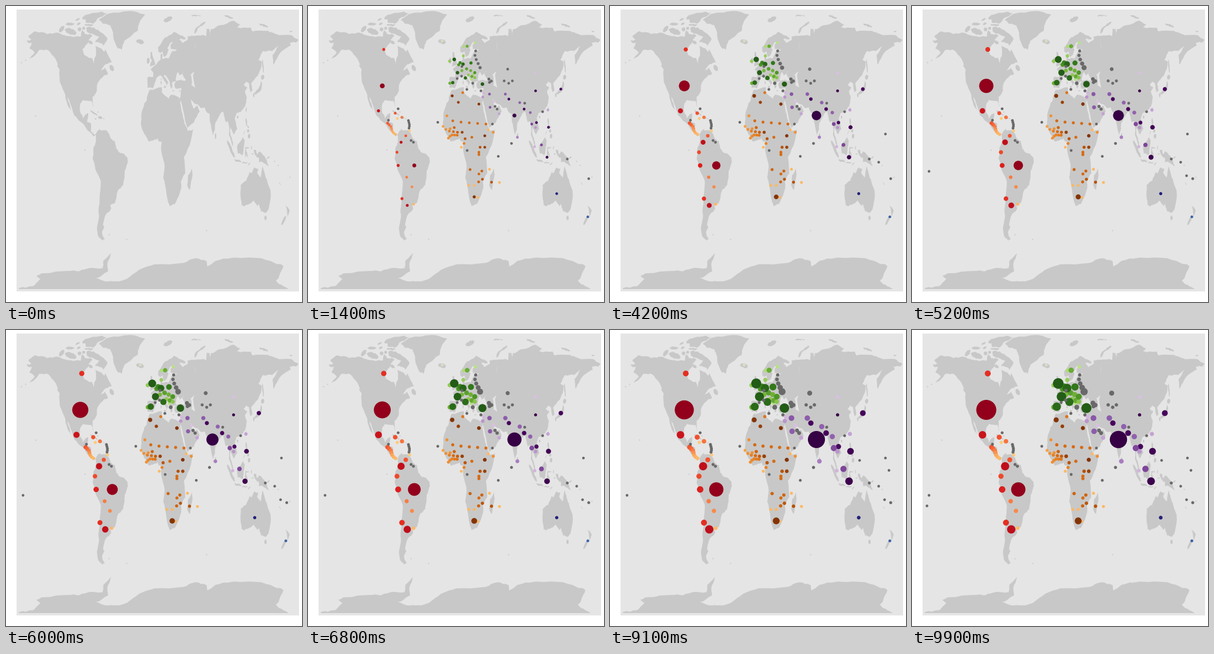
A matplotlib script for the animation above (10 s loop, 504x504 px).

```python
import random

import matplotlib.pyplot as plt
import numpy as np
from matplotlib.animation import FuncAnimation
from matplotlib.collections import PolyCollection
from matplotlib.colors import LinearSegmentedColormap

random.seed(4)
SEA, LAND = "#e5e5e5", "#c8c8c8"
FRAMES = 100

fig = plt.figure(figsize=(7, 7), dpi=72, facecolor="white")
ax = fig.add_axes([0, 0, 1, 1])
ax.set(xlim=(0, 504), ylim=(504, 0))
ax.axis("off")
ax.add_patch(plt.Rectangle((18, 5.5), 480.5, 480.5, color=SEA, lw=0))

shapes = []


def project(lon, lat):
    return 252.5 + 1.293 * lon, 243 - 2.805 * np.maximum(lat, -85.2)


def roughen(pts, amount=0.1):
    """Insert a randomly shifted midpoint into every edge."""
    out = []
    for a, b in zip(pts, np.roll(pts, -1, axis=0)):
        size = min(0.5, amount * np.hypot(*(b - a)))
        out += [a, (a + b) / 2 + [random.uniform(-size, size) for _ in "xy"]]
    return np.array(out)


def land(*coords):
    """Add a coast from key points given as lon, lat pairs."""
    pts = roughen(roughen(np.reshape(coords, (-1, 2))))
    shapes.append(np.column_stack(project(*pts.T)))


def isles(*data):
    """Add rough ovals given as lon, lat, length, width, tilt."""
    turn = np.linspace(0, 2 * np.pi, 8, endpoint=False)
    for lon, lat, length, width, tilt in np.reshape(data, (-1, 5)):
        u, v = length / 2 * np.cos(turn), width / 2 * np.sin(turn)
        c, s = np.cos(np.radians(tilt)), np.sin(np.radians(tilt))
        land(*np.ravel(np.column_stack([lon + u * c - v * s, lat + u * s + v * c])))


# The Americas and Greenland
land(-168, 65.6, -162, 66.4, -166, 68.3, -157, 71.3, -141, 69.6, -128, 70.5,
     -115, 68.4, -97, 68, -95, 72, -91, 69.5, -85, 69.7, -81.5, 68.5,
     -86, 66.5, -87, 64.5, -94.5, 60.5, -92.5, 57, -82.3, 55.2, -80, 51.4,
     -79, 54.5, -76.7, 57, -77.5, 62.4, -70, 61, -66, 58.7, -64.5, 60.3,
     -56, 52.5, -66.5, 50.2, -71, 47, -65, 49.2, -61, 45.5, -66, 44.5,
     -70.7, 42.5, -75.5, 38.5, -75.6, 35.2, -81.3, 31.5, -80.3, 25.2,
     -82.8, 29, -94, 29.6, -97.5, 27, -97.8, 22.5, -94, 18.2, -90.4, 21,
     -87, 21.5, -88.5, 16, -83.2, 15, -83.5, 10.5, -77.4, 8.6, -80, 7.5,
     -85.8, 10.5, -92.2, 14.5, -105.5, 20.3, -112.5, 30, -114.8, 31.8,
     -109.5, 23, -115, 28, -117.2, 32.7, -124.3, 40.4, -124.7, 48.4,
     -130, 54.5, -139.5, 59.7, -151.5, 60, -158, 56.3, -164.5, 54.6,
     -157.5, 58.5, -164.5, 61, -161, 64, -166.5, 64.6)
land(-80, 73.7, -68, 70, -61.5, 66.7, -67, 62.5, -72, 64.2, -78, 64.8,
     -72.5, 68, -89, 71.2, -89.5, 73.5)
land(-90, 76.4, -79, 76.3, -75, 79, -62, 82.4, -70, 83.1, -92, 81)
land(-73, 78.3, -60, 82, -33, 83.6, -12, 81.5, -20, 76, -22, 71.5,
     -39.5, 65.5, -43, 60, -48, 61, -53.5, 66.5, -54.5, 71, -58, 75, -68, 76)
land(-77.4, 8.6, -72, 12, -70, 11, -62, 10.7, -57, 6, -52, 4.7, -50, 0,
     -44.3, -2.7, -40, -2.9, -35.2, -5.6, -34.8, -8, -39, -13.5, -39.2, -17.5,
     -41, -22, -48.5, -26, -52, -33, -58, -34.2, -56.8, -36.5, -62.2, -39,
     -65, -41, -67.5, -46, -65.8, -47.5, -69, -50.5, -68, -53, -65.2, -54.8,
     -68, -55.8, -74, -53, -75.5, -48, -73, -42, -73.5, -37, -70.3, -20,
     -76.2, -14, -81.2, -6, -80, -3, -80, .8, -77, 4)
isles(-110, 71, 16, 3.6, -8, -122, 72.7, 8, 3, 20, -86, 75.2, 12, 1.2, 0,
      -111, 75.7, 12, 1.5, 0, -98.5, 72.5, 5, 2.4, 0, -93, 73.1, 4, 2, 0,
      -99.5, 75.8, 5, 1.5, 10, -91, 79.7, 8, 2.4, 10, -101, 78.4, 6, 1.2, 10,
      -84, 64.5, 6, 2, -10, -56, 49, 6.5, 3.6, -20, -126, 49.6, 5, 1, -30,
      -79.5, 21.7, 11, 1.2, -17, -71.2, 18.9, 6, 1.7, -5, -77.3, 18.1, 2.4, .8, 0,
      -66.4, 18.2, 1.8, .6, 0)
# Africa
land(-6, 35.8, 10, 37.3, 10, 34, 19, 30.3, 22, 32.8, 32.6, 31.2, 32.6, 29.9,
     37.2, 21, 39.5, 15.5, 44, 10.7, 51.2, 11.9, 48, 4.5, 39, -5, 40.7, -15,
     35, -19.8, 35.5, -24, 32.5, -28.4, 27, -33.6, 20, -34.8, 18, -32,
     14.5, -22.5, 11.8, -17.5, 13.7, -11, 9, -1, 9.7, 4, 6, 4.3, 4.3, 6.3,
     -2, 4.8, -7.5, 4.4, -13.3, 9, -17.5, 14.7, -17, 21, -13, 27.7,
     -9.8, 29.5, -9.7, 31.5)
land(49.3, -12, 50.4, -15.5, 47, -25, 43.3, -22, 44.5, -16.2)
# Europe
land(30, 60, 22, 60.5, 21.5, 63, 25, 65, 21.5, 64.5, 17.2, 61, 18.8, 60,
     16.5, 57, 12.8, 55.6, 10.5, 59.3, 8, 58, 5.3, 59, 5, 61.5, 14, 67.5,
     26, 71, 41, 67.3, 41, 66.3, 33, 66.6, 38, 63.9, 36, 59)
land(-9, 43.2, -1.8, 43.4, -1.2, 46, -4.5, 48.2, -1.6, 49.6, 4.5, 52.5,
     8.5, 53.8, 8.2, 57, 10.5, 57.6, 10, 54.5, 18.5, 54.7, 21.5, 57.5,
     23.5, 59.2, 29.5, 59.9, 30, 62, 44, 66, 44, 68.3, 54, 68.5, 54, 46.9,
     47.5, 45.2, 49.5, 40.5, 48.5, 38, 41.5, 41.6, 37, 45.3, 39, 47.2,
     33.7, 44.4, 30.8, 46.5, 28, 42, 29, 41.2, 23.5, 40.4, 24, 37.8,
     22, 36.5, 19.5, 41.5, 13.6, 45, 12.5, 44, 18.5, 40.2, 16, 38,
     15.6, 40, 8.8, 44.4, 3.1, 43.2, 0, 38.8, -2, 36.7, -8.9, 37)
land(-5.5, 50.1, 1.4, 51.2, 0, 53.5, -1.7, 55.6, -3, 58.6, -5, 58.6,
     -5, 54.8, -3, 54, -5, 51.8)
isles(14, 37.5, 3, 1.2, 0, 9, 40.1, 1.4, 2.2, 0, 9, 42.2, .8, 1.4, 0,
      25, 35.2, 2.6, .6, 0, 33.3, 35.1, 2, .8, 20, -18.8, 65, 10.5, 2.8, -5,
      -8, 53.4, 4, 3.6, 20, 18, 78.6, 12, 3, 10, 55, 80.7, 13, .9, 0,
      55, 72, 6, 2.4, 40, 62, 75.2, 12, 1.6, 18)
# Asia
land(42, 42.5, 41.5, 41.6, 35, 42, 29, 41.2, 26.5, 39.5, 27.5, 36.8,
     36, 36.8, 34.4, 31.4, 32.6, 30, 34, 27.8, 35, 29.5, 39, 21.5,
     43.5, 12.7, 52, 15.8, 59.8, 22.5, 56.3, 26.2, 51.5, 24.3, 48, 30,
     52, 27.7, 56.5, 27, 63, 25.2, 63, 38, 54, 37, 48.8, 38.4, 49.5, 40.5,
     47.5, 42.5)
land(53, 47, 51, 44.5, 54, 37, 60, 25.3, 66.6, 25, 69.2, 22.2, 72.6, 21.5,
     73, 17, 77.5, 8, 80, 12, 80.2, 15.5, 87, 21.3, 91, 22.5, 94.3, 16,
     97, 16.7, 98.5, 13, 98.3, 8.5, 103.5, 1.3, 103.4, 4, 100.3, 8.4,
     100, 13.4, 104.8, 8.7, 109.2, 12, 106, 18.7, 108.2, 21.6, 114, 22.4,
     119.5, 25.7, 121.7, 31.2, 119.3, 35, 122.4, 37.2, 117.8, 39, 121.2, 40.8,
     124.5, 40, 126.5, 34.4, 129.3, 35.4, 127.5, 39.5, 135.5, 44,
     140.3, 48.5, 141.4, 53, 137, 54, 120, 60, 53, 60)
land(53, 68.5, 68.5, 68.3, 69, 73, 72.5, 72.8, 73.5, 68, 74.5, 72.5,
     87, 75, 104.3, 77.7, 113, 75.5, 109, 73.8, 127, 73.5, 129, 71.2,
     150, 71.5, 160, 69.7, 180, 69, 190, 66, 187, 64.5, 178.5, 64.5,
     179.5, 62.4, 170.3, 60, 162.8, 56, 156.8, 51, 155.8, 56.8, 164, 62.5,
     155, 59.3, 143, 59.3, 137, 54, 141, 53, 120, 48, 53, 50)
land(131, 34, 135, 35.6, 139.5, 38.5, 140.3, 41.2, 142, 39.6, 140.8, 35.8,
     135.8, 33.5)
isles(98, 80, 12, 1.4, -8, 144, 74.8, 12, 1.6, -8, 180, 71.2, 4, .8, 0,
      143, 50.2, 8.5, 1.8, -80, 131, 32.5, 2, 2.6, 0, 133.5, 33.5, 3, 1, 10,
      142.7, 43.4, 4.5, 3, 10, 121, 23.7, 1.3, 3, -10, 109.7, 19.2, 2, 1.8, 0,
      80.7, 7.7, 1.9, 3.6, 0, 101, -.3, 15, 3, -45, 110, -7.3, 9.5, 1.3, -7,
      119, -8.5, 8, .7, 0, 125, -9.2, 4, .8, 25, 120.3, -2, 1.6, 6.6, 0,
      122.5, .6, 5, .8, 0, 122, -3.4, 1.3, 4, 25, 128, .6, 1, 2.5, 0,
      129.5, -3.2, 3, .6, 0, 150, -5.4, 4, .9, 20, 121.2, 16.2, 1.8, 5, 10,
      123.5, 13.3, 3, 1, -25, 124.8, 7.6, 3.4, 3, 20, 123.6, 10.8, 3, 2, 0,
      118.4, 9.8, 3.4, .5, 48)
land(109, 1.5, 114, 4.6, 117, 7, 119, 5, 117.8, 1, 116.3, -3.8, 110.2, -3)
# Oceania and Antarctica
land(131, -.8, 134, -.9, 135, -3.3, 138, -1.7, 145, -4.5, 150.8, -10.5,
     143.5, -8.5, 138, -8.2, 138, -5.5, 133, -4)
land(142.5, -10.8, 145.3, -15, 149, -20.3, 153, -25.2, 153.5, -28.5,
     150, -37.2, 146.4, -39, 140.6, -38, 137.7, -33.5, 136, -34.8,
     131, -31.5, 123.5, -33.9, 118, -35, 115.1, -34.2, 113.5, -26,
     113.8, -22, 121, -19.5, 125.5, -14.2, 128, -15, 132, -11.4,
     136.8, -12.2, 135.5, -14.8, 140, -17.5)
land(172.7, -34.5, 178.4, -37.7, 175.3, -41.5, 174.8, -38)
isles(146.5, -42, 3.2, 2.8, 0, 170.3, -43.6, 8.5, 2.2, 42, 165.5, -21.2, 3, .5, -35)
land(-180, -87, -178, -84.5, -160, -83.5, -150, -79, -157, -77.2, -146, -75.6,
     -114, -74.2, -100, -74.5, -90, -73, -68, -72.5, -67, -68, -57, -63.3,
     -62, -70, -61, -74.5, -77, -78.5, -65, -80.5, -50, -80.5, -36, -79,
     -20, -73.5, 0, -70.2, 39, -69.3, 54, -66.5, 69, -68.3, 70, -71.5,
     81, -68, 95, -66.8, 135, -66.3, 158, -69.3, 170, -71.3, 164, -78,
     160, -80, 170, -83.5, 184, -87)

ax.add_collection(PolyCollection(shapes, facecolors=LAND, linewidths=0))
specks = np.reshape([50, 187, 134, 245, 175, 389, 205, 397, 341, 382, 483, 291,
                     457, 264, 463, 271, 26, 96, 33, 92, 156, 180], (-1, 2))
ax.scatter(*specks.T, s=4, c=LAND, lw=0)


# Waves of growth: (middle step, weight) each
NORTH = (25, .1), (50, .55), (90, .35)
SOUTH = (32, .25), (64, .72)
LATE = (42, .3), (68, .7)
EUROPE = (14, .03), (50, .37), (66, .2), (92, .45)
INDIA = (36, .28), (68, .65), (90, .07)
ASIA = (44, .25), (80, .75)
AFRICA = (30, .2), (52, .25), (76, .55)


def share(step, waves):
    def total(t):
        return sum(w / (1 + np.exp((mid - t) / 6)) for mid, w in waves)
    return total(step) / total(FRAMES - 1)


def palette(low, high, *colors):
    """Colour by the log of the total, from low to high millions."""
    cmap = LinearSegmentedColormap.from_list("", colors)
    return lambda n: cmap(np.log(n / low) / np.log(high / low))


REDS = palette(.1, 20, "#fdcb7a", "#fdae5c", "#f4582f", "#dc1f1d", "#b5081a", "#92001b")
GREENS = palette(.2, 8, "#b8e186", "#a2d267", "#7fbc41", "#4d9425", "#2f7519", "#235c16")
BROWNS = palette(.03, .3, "#fdb863", "#ee8a2b", "#cb5f0b", "#a54806", "#843405")
VIOLETS = palette(.2, 8, "#d9bfe2", "#c4a1d4", "#9a6cb4", "#8553a4", "#641b78", "#3b0049")
PLUM = palette(.1, 10, "#3b0049", "#4a0560", "#360044")
BLUES = palette(.01, .2, "#3b62a5", "#22207a")
GREY = palette(.1, 10, "#696969", "#696969")
PALE = palette(.1, 10, "#d9dfc2", "#d9dfc2")

bubbles = []


def dots(colors, waves, start, *data):
    """Add bubbles as x, y, final millions, appearing from step start on."""
    for i, (x, y, total) in enumerate(np.reshape(data, (-1, 3))):
        bubbles.append((x, y, total, colors(total), waves, start + 3 * i % 4))


def chain(colors, waves, start, count, first, last, *path):
    """Space bubbles evenly along a path, totals running from first to last."""
    x, y = np.reshape(path, (-1, 2)).T
    run = np.append(0, np.cumsum(np.hypot(np.diff(x), np.diff(y))))
    at = np.linspace(0, run[-1], count)
    totals = np.geomspace(first, last, count)
    dots(colors, waves, start, *np.ravel(np.column_stack(
        [np.interp(at, run, x), np.interp(at, run, y), totals])))


# Americas
dots(REDS, NORTH, 3, 126.5, 136, 48.5, 129, 74, 1.8)
dots(REDS, SOUTH, 8, 181, 271.5, 22, 120, 178.5, 3.9, 153.5, 271.5, 2.4,
     160, 328, 1.8, 151.5, 249, 1.1)
dots(REDS, LATE, 8, 158.5, 232, 5.1, 169, 339.5, 5.3, 166.5, 221, .9,
     148.5, 182.5, .96, 160, 189.5, .6, 168, 291.5, .54, 177, 308, .46,
     180, 337.5, .2, 152, 191.5, .1, 173, 212.5, .08)
chain(REDS, LATE, 8, 7, .9, .2, 135.5, 199.5, 141, 205, 144, 215, 149, 218.5)
chain(GREY, ASIA, 9, 5, .03, .03, 171, 195, 173, 203, 172, 208)
chain(GREY, ASIA, 9, 2, .03, .03, 175.5, 229, 179.5, 232)
# Europe and its neighbours
dots(GREENS, EUROPE, 6, 241, 94, .57, 278, 125, .2, 273, 117.5, .6, 281, 117, .35,
     285, 62.5, .19, 265, 69, .27, 264.5, 85, .5, 262, 110, 1, 270, 107, 1.5,
     277, 110, 1.1, 271, 68.5, 1.2, 279, 120, 1.25, 284, 122, .7, 256.5, 100, 1.8,
     241.5, 131.5, 1.15, 277.5, 97, 3.5, 284, 113.5, 1.8, 259, 96.5, 2.6,
     246.5, 130.5, 5.2, 268, 122.5, 5, 297, 133, 8.8, 264, 99, 5.9,
     254.5, 113.5, 7.7, 249, 91, 10.3)
dots(PALE, EUROPE, 7, 228.5, 59.5, .02)
chain(GREY, EUROPE, 7, 5, .1, 3.5, 285.5, 76.5, 284, 86, 293, 105)
chain(GREY, EUROPE, 8, 3, .9, .3, 308, 124.5, 313, 128.5, 309, 130)
chain(GREY, ASIA, 8, 3, .1, .1, 334, 127.5, 343.5, 132.5, 348, 127.5)
chain(GREY, ASIA, 6, 2, .3, .3, 318.5, 171, 322, 175.5)
dots(GREY, ASIA, 7, 280.5, 131.5, .9, 261.5, 119.5, .1, 254, 123.5, .02,
     262, 103, .09, 340, 107.5, .96, 270.5, 142, .03, 294.5, 144.5, .1)
# Africa
chain(BROWNS, AFRICA, 8, 5, .08, .08, 246.5, 195.5, 262.5, 198, 303, 201)
chain(BROWNS, AFRICA, 8, 5, .04, .1, 230, 205, 237, 212.5, 254.5, 215)
chain(BROWNS, AFRICA, 8, 5, .05, .07, 239, 225, 244, 219.5, 254, 220)
chain(BROWNS, AFRICA, 8, 2, .05, .09, 242, 209, 249, 207)
chain(BROWNS, AFRICA, 8, 3, .12, .03, 267.5, 226, 265, 237, 261, 240.5)
chain(BROWNS, AFRICA, 8, 2, .13, .2, 293, 240.5, 301, 240.5)
chain(BROWNS, AFRICA, 8, 2, .08, .08, 291, 249, 291, 253)
chain(BROWNS, AFRICA, 8, 2, .03, .03, 273.5, 305.5, 283, 305.5)
dots(BROWNS, AFRICA, 7, 245.5, 153, .95, 256, 164, .21, 291, 167, .36,
     263.5, 147.5, .07, 301, 221, .37, 262.5, 215, .21, 236.5, 187, .05,
     279, 223.5, .08, 307, 211, .03, 315.5, 215, .05, 276, 278.5, .09,
     291, 286, .08, 296, 281, .09, 290.5, 299.5, .09, 297, 295, .12,
     312.5, 300, .13, 326, 300.5, .03, 309, 278, .03, 289, 326, .03,
     283, 325, 2.95)
# Asia and Oceania
dots(PLUM, ASIA, 3, 387.5, 144.5, .08, 342, 158.5, 1.28, 368, 175.5, 1.57,
     407, 257.5, 4.25, 430.5, 141.5, 1.7, 389, 198.5, 1.2, 409.5, 206.5, 2.83)
dots(PLUM, INDIA, 4, 351.5, 186.5, 34.6)
dots(VIOLETS, ASIA, 4, 387.5, 114, .2, 316, 163, .2, 299, 148, .25, 297.5, 155, .5,
     325.5, 183.5, .4, 386, 239.5, .26, 397.5, 236.5, 2.2, 356.5, 223.5, .7,
     387.5, 207, .5, 408.5, 177, .4, 309, 150, 1.6, 310, 172.5, 1.4,
     378.5, 181.5, 1.2, 360.5, 164.5, 1.2, 336, 150, 1.4, 381, 201, 2.1)
dots(BLUES, ASIA, 4, 423.5, 319.5, .2, 476.5, 359, .01)
# Remote places, the last seven of them with late first cases
dots(GREY, ASIA, 8, 369, 165.5, .03, 399.5, 180, .01, 314, 201, .01, 324, 256, .01,
     346.5, 234, .05, 271, 246, .01, 221, 198, .01, 137, 194.5, .02,
     153.5, 175, .01, 441.5, 260.5, .02, 478, 294, .03)
for x, y, start in [(457.5, 266, 40), (469, 218, 42), (467.5, 289, 44),
                    (29, 281.5, 45), (475, 239, 71), (425, 222, 85),
                    (25.5, 299.5, 93)]:
    dots(GREY, ASIA, start, x, y, .001)

xs, ys, _, fills, _, _ = zip(*bubbles)
balls = ax.scatter(xs, ys, s=0, c=fills, lw=0, zorder=3)


def radius(bubble, step):
    total, waves, start = bubble[2], bubble[4], bubble[5]
    if step < start:
        return 0
    return 2.2 + 2.13 * np.sqrt(total * share(step, waves))


def draw(step):
    balls.set_sizes([(2 * radius(b, step)) ** 2 for b in bubbles])
    return balls,


anim = FuncAnimation(fig, draw, frames=FRAMES, interval=100, repeat=True,
                     repeat_delay=0, init_func=lambda: draw(0))
plt.show()
```
